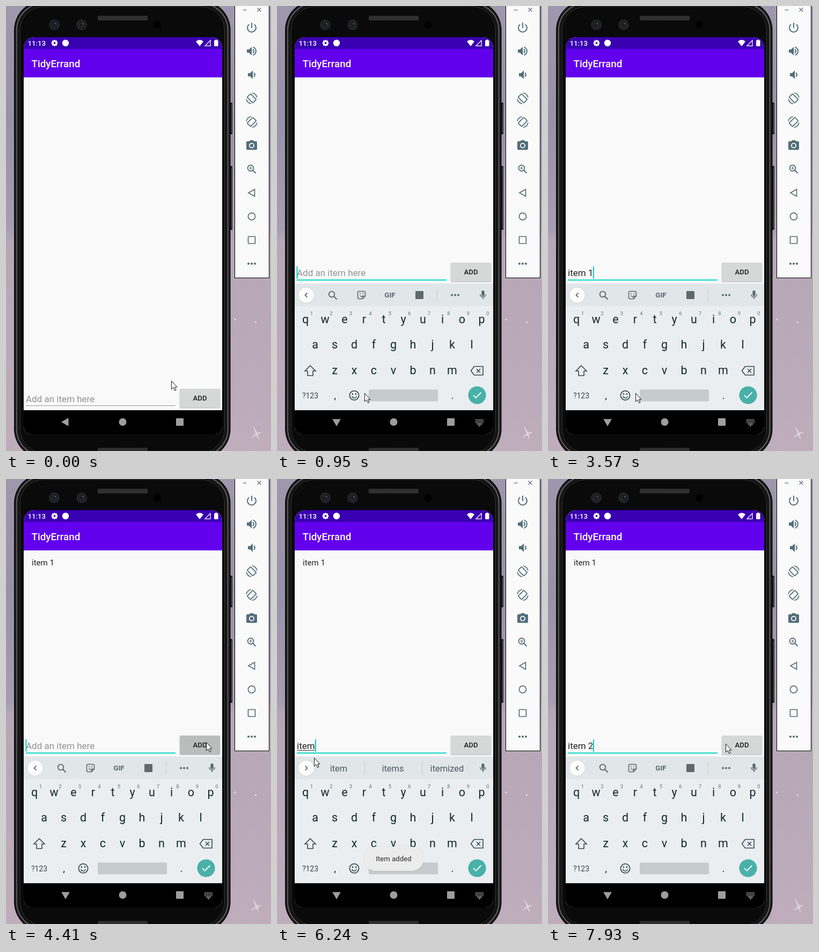
Write an HTML page with a canvas that moves like this. It is 494 px wide and 829 px high and loops after 7.99 s.

```html
<!DOCTYPE html>
<html lang="en">
<head>
<meta charset="utf-8">
<title>Todo list demo</title>
<style>
html, body { margin: 0; width: 100%; height: 100%; overflow: hidden; background: #b5a6b6; }
canvas { display: block; width: 494px; height: 829px; }
</style>
</head>
<body>
<canvas id="stage" width="494" height="829"></canvas>
<script>
const W = 494, H = 829, LOOP = 7990, TAU = Math.PI * 2;
const FONT = 'Roboto, "Noto Sans", sans-serif';
const TEAL = '#03d5c3', SLATE = '#546e7a', INK = '#11272f';
const main = document.getElementById('stage').getContext('2d');
const layer = document.createElement('canvas');
layer.width = W;
layer.height = H;
const keysCtx = layer.getContext('2d');
let c = main;

// [time, text, suggestions]; no suggestions shows the tool row
const EDITS = [
  [660, ''],
  [1470, 'i', ['I', "I'm", 'is']],
  [1960, 'it', ['it', "it's", 'its']],
  [2320, 'ite', ['item', 'items', 'iterate']],
  [2650, 'item', ['item', 'items', 'itemized']],
  [3420, 'item '],
  [3570, 'item 1'],
  [4370, ''],
  [5830, 'i', ['I', "I'm", 'is']],
  [5980, 'it', ['it', "it's", 'its']],
  [6100, 'ite', ['item', 'items', 'iterate']],
  [6220, 'item', ['item', 'items', 'itemized']],
  [6450, 'item '],
  [6550, 'item 2']
];
const MOUSE = [
  [60, 308, 698], [430, 163, 721], [3735, 163, 721], [4130, 373, 490],
  [4430, 373, 490], [4900, 69, 519], [7490, 69, 519], [7750, 354, 433], [7930, 331, 493]
];

const clamp = v => Math.max(0, Math.min(1, v));
const ramp = (t, a, b) => clamp((t - a) / (b - a));
const smooth = p => p * p * (3 - 2 * p);

function rect(x, y, w, h, color) {
  c.fillStyle = color;
  c.fillRect(x, y, w, h);
}
function round(x, y, w, h, r, color) {
  c.fillStyle = color;
  c.beginPath();
  c.roundRect(x, y, w, h, r);
  c.fill();
}
function ring(x, y, w, h, r, color, line) {
  c.strokeStyle = color;
  c.lineWidth = line;
  c.beginPath();
  c.roundRect(x, y, w, h, r);
  c.stroke();
}
function dot(x, y, r, color) {
  c.fillStyle = color;
  c.beginPath();
  c.arc(x, y, r, 0, TAU);
  c.fill();
}
function arc(x, y, r, color, line, from = 0, to = TAU) {
  c.strokeStyle = color;
  c.lineWidth = line;
  c.beginPath();
  c.arc(x, y, r, from, to);
  c.stroke();
}
function text(s, x, y, size, color, align = 'left', weight = 400) {
  c.font = `${weight} ${size}px ${FONT}`;
  c.textAlign = align;
  c.fillStyle = color;
  c.fillText(s, x, y);
}
// Path with its origin at (x, y)
function line(d, x, y, color, width) {
  c.save();
  c.translate(x, y);
  c.strokeStyle = color;
  c.lineWidth = width;
  c.stroke(new Path2D(d));
  c.restore();
}
function shape(d, x, y, color) {
  c.save();
  c.translate(x, y);
  c.fillStyle = color;
  c.fill(new Path2D(d));
  c.restore();
}
function lens(x, y, r, color, w) {
  arc(x - 2, y - 2, r, color, w);
  const k = r * .7 - 2;
  line(`M${k} ${k}L7.5 7.5`, x, y, color, w + .3);
}

function backdrop() {
  const g = c.createLinearGradient(0, 0, 0, H);
  [[0, '#9d98ad'], [.25, '#9891a9'], [.5, '#a79db2'], [.53, '#b6a7b7'], [.75, '#b9a9b9'], [1, '#bfadbc']]
    .forEach(([p, color]) => g.addColorStop(p, color));
  rect(0, 0, W, H, g);
  dot(427, 584, 1.4, '#f3e9ee');
  dot(465.5, 589, 1.4, '#f3e9ee');
  shape('M-6-13L1.5-2L9-2L2 2L4 11L-1 3L-9 8L-2 0Z', 467, 796, '#d6cad5');
  line('M-6-13L4 11M-9 7L9-2', 467, 796, '#eee5ec', .8);
}

function mesh(y) {
  round(171, y, 93, 9, 2, '#292929');
  for (let x = 172; x < 263; x += 3) rect(x, y + 1, 1, 7, '#3b3b3b');
}

function phone() {
  round(416, 180, 6, 59, 2, '#151515');
  rect(420, 183, 1, 53, '#666');
  round(416, 298, 6, 119, 2, '#151515');
  rect(420, 301, 1, 113, '#666');
  round(15, -10, 403.5, 853, 55, '#080808');
  ring(17.5, -7.5, 398.5, 848, 52.5, '#343434', 1);
  ring(20, -5, 393.5, 843, 50, '#777', 1.6);
  ring(23, -2, 387.5, 837, 47, '#1d1d1d', 2);
  ring(26, 1, 381.5, 831, 44, '#414141', 1);
  round(27, 2, 379.5, 829, 43, '#0a0a0a');
  mesh(18);
  mesh(823);
  for (const x of [90, 141]) {
    dot(x, 35, 10, '#22242a');
    dot(x, 35, 6.5, '#15171c');
    arc(x, 35, 4, '#3a3d46', 1.2);
    dot(x + 2, 33, 1.2, '#596070');
  }
  dot(282, 35, 7, '#000');
}

function turnIcon(y, dir) {
  c.save();
  c.translate(458, y);
  c.scale(dir, 1);
  c.rotate(-Math.PI / 4);
  ring(-4.5, -7.5, 9, 15, 1, SLATE, 1.8);
  c.rotate(Math.PI / 4);
  arc(0, 0, 10, SLATE, 1.7, -1.5, -.15);
  arc(0, 0, 10, SLATE, 1.7, 1.65, 3);
  c.restore();
}

function speaker(x, y) {
  shape('M-5-3L-1-3L4-8L4 8L-1 3L-5 3Z', x, y, SLATE);
  arc(x + 4, y, 4, SLATE, 2, -1.1, 1.1);
}

function panel() {
  rect(426, -2, 65, 509, '#000');
  rect(427, -2, 63, 508, '#fafafa');
  const x = 458;
  line('M-3.5 0H3.5', 445, 7.5, SLATE, 1.2);
  line('M-3.5-3.5L3.5 3.5M3.5-3.5L-3.5 3.5', 472, 7, SLATE, 1.2);
  arc(x, 40.5, 8, SLATE, 2, -.9, Math.PI + .9);
  line('M0-9V1', x, 40, SLATE, 2);
  speaker(x - 4, 84);
  arc(x, 84, 8, SLATE, 2, -1.25, 1.25);
  speaker(x - 2, 128);
  turnIcon(172, 1);
  turnIcon(216, -1);
  round(x - 10, 252, 20, 16, 2, SLATE);
  shape('M-5-7L-3-10H3L5-7Z', x, 260, SLATE);
  dot(x, 260, 5, '#fafafa');
  dot(x, 260, 3.2, SLATE);
  lens(x, 304, 5.5, SLATE, 1.8);
  line('M-5-2H1M-2-5V1', x, 304, SLATE, 1.2);
  line('M5.5-6.5V6.5L-6 0Z', x, 348, SLATE, 1.7);
  arc(x, 392, 6.6, SLATE, 1.7);
  ring(x - 6.5, 429.5, 13, 13, .5, SLATE, 1.7);
  for (const d of [-6, 0, 6]) dot(x + d, 480, 2.1, SLATE);
}

function statusBar() {
  rect(33, 58, 370, 23, '#3900b1');
  text('11:13', 40.5, 74, 13.2, '#fff', 'left', 500);
  for (let i = 0; i < 8; i++) {
    const a = i * TAU / 8;
    line(`M0 0L${Math.cos(a) * 6} ${Math.sin(a) * 6}`, 90.5, 69, '#fff', 2.6);
  }
  arc(90.5, 69, 3.4, '#fff', 2.8);
  dot(90.5, 69, 1.9, '#3900b1');
  dot(111, 69, 6.2, '#fff');
  shape('M0 6L-7-3Q0-9 7-3Z', 361, 69, '#fff');
  line('M5-5V5.3H-5Z', 376, 69, '#fff', 1.3);
  round(388, 64, 7.5, 11, 1, '#fff');
  rect(390, 62.7, 3.5, 2, '#fff');
}

function appBar() {
  rect(33, 80, 370, 53, '#6200ee');
  text('TidyErrand', 47.5, 114, 18.8, '#fff', 'left', 500);
}

function inputRow(t, edit) {
  const dy = t < 700 ? 235 : 0;
  const typed = edit ? edit[1] : '';
  c.font = `400 17px ${FONT}`;
  const end = 37 + c.measureText(typed).width;
  if (typed) text(typed, 37, 503, 17, '#212121');
  else text('Add an item here', 37, 503 + dy, 17, '#919191');
  if (edit && edit[2]) rect(37, 505, end - 37, 1, '#333');
  if (edit) {
    rect(37, 509.5 + dy, 279, 2, TEAL);
    if ((t - edit[0]) % 1000 < 500) rect(Math.round(end) - (typed ? 0 : .5), 485 + dy, 2, 23, TEAL);
  } else {
    rect(37, 744, 279, 1, '#979797');
  }

  c.save();
  c.shadowColor = 'rgba(0,0,0,.3)';
  c.shadowBlur = 2;
  c.shadowOffsetY = 1;
  round(324, 478 + dy, 75, 35, 2, '#d6d7d7');
  c.restore();
  const press = ramp(t, 4340, 4420) * (1 - ramp(t, 4430, 4800));
  if (press) round(324, 478 + dy, 75, 35, 2, `rgba(0,0,0,${.14 * press})`);
  text('ADD', 361.5, 500 + dy, 13.2, '#1c1c1c', 'center', 500);
}

function toolRow(words) {
  const grey = '#5c6970';
  rect(33, 517, 370, 42, '#e1e6e9');
  c.save();
  c.shadowColor = 'rgba(0,0,0,.18)';
  c.shadowBlur = 2;
  dot(54.5, 538.5, 14.3, '#fdfdfd');
  c.restore();
  line(words ? 'M-2-4L2 0L-2 4' : 'M2-4L-2 0L2 4', 54.5, 538.5, '#46545b', 1.6);
  round(381.3, 530, 5.4, 10.5, 2.7, grey);
  arc(384, 537, 5.3, grey, 1.5, 0, Math.PI);
  line('M0 5V9', 384, 537, grey, 1.6);
  if (words) {
    words.forEach((w, i) => text(w, 115 + i * 101, 545, 16.5, '#4b5960', 'center'));
    rect(163, 527, 1, 23, '#c3c9cd');
    rect(270, 527, 1, 23, '#c3c9cd');
    return;
  }
  lens(104, 539, 5.3, grey, 1.8);
  line('M-4.5-7H4.5Q7-7 7-4.5V2L2 7H-4.5Q-7 7-7 4.5V-4.5Q-7-7-4.5-7ZM2 7V4Q2 2 4 2H7', 157.5, 538.5, grey, 1.6);
  dot(155, 536, 1.1, grey);
  dot(160, 536, 1.1, grey);
  arc(157.5, 538, 3.2, grey, 1.3, .3, 2.8);
  text('GIF', 210.5, 543, 13.5, grey, 'center', 700);
  round(258, 531, 15, 15, 1, grey);
  rect(298, 528, 1, 22, '#c6ccd0');
  for (const d of [-6, 0, 6]) dot(332 + d, 538.5, 2, grey);
}

function keyboard(words) {
  c.clearRect(0, 0, W, H);
  rect(33, 559, 370, 194, '#eaeef1');
  toolRow(words);
  [...'qwertyuiop'].forEach((k, i) => {
    const x = 53 + i * 36.5;
    text(k, x, 590.5, 21.5, INK, 'center');
    text((i + 1) % 10, x + 11.5, 575.5, 9.5, '#66737a', 'center');
  });
  [...'asdfghjkl'].forEach((k, i) => text(k, 71 + i * 36.5, 638, 21.5, INK, 'center'));
  [...'zxcvbnm'].forEach((k, i) => text(k, 107.5 + i * 36.5, 685.5, 21.5, INK, 'center'));
  line('M0-9.5L10 .5H5V9H-5V.5H-10Z', 62, 679.5, '#344850', 1.6);
  line('M-5.5-8H11V8H-5.5L-11.5 0ZM-1-3.5L6 3.5M6-3.5L-1 3.5', 373, 679.5, '#344850', 1.6);
  text('?123', 62, 730.5, 14, '#33464e', 'center');
  text(',', 108, 732, 19, INK, 'center');
  text('.', 327, 732, 19, INK, 'center');
  arc(144, 725.5, 8.6, '#344850', 1.7);
  dot(141, 723, 1.4, '#344850');
  dot(147, 723, 1.4, '#344850');
  arc(144, 726, 4.3, '#344850', 1.6, .2, 2.94);
  round(171, 714.5, 129, 22, 2, '#c6cbce');
  dot(373, 725, 16.6, '#49b1a8');
  line('M-7 0L-2.5 5L7.5-5', 373, 725, '#fff', 1.8);
}

function navBar(t) {
  const white = 'rgba(255,255,255,.62)';
  const spin = ramp(t, 690, 855);
  c.save();
  c.translate(112 - spin, 775 - spin);
  c.rotate(Math.PI - spin * Math.PI / 2);
  c.fillStyle = white;
  c.beginPath();
  for (let i = 0; i < 3; i++) c.lineTo(Math.cos(i * TAU / 3) * 9, Math.sin(i * TAU / 3) * 9);
  c.fill();
  c.restore();
  dot(217.5, 775, 7, white);
  round(317, 768, 14, 14, 1, white);
  const show = ramp(t, 700, 860);
  if (!show) return;
  c.globalAlpha = show;
  for (let row = 0; row < 3; row++)
    for (let i = 0; i < 6; i++) rect(370 + i * 2.6, 770 + row * 2.7, 1.7, 1.7, white);
  rect(373, 778, 9, 1.7, white);
  shape('M-2.5 0H2.5L0 2.5Z', 377.5, 781, white);
  c.globalAlpha = 1;
}

function toast(t) {
  const a = ramp(t, 4500, 4800) * (1 - ramp(t, 6480, 6800));
  if (!a) return;
  c.globalAlpha = a;
  c.save();
  c.shadowColor = 'rgba(0,0,0,.08)';
  c.shadowBlur = 3;
  round(162, 685, 111, 45, 22, '#ececec');
  c.restore();
  text('Item added', 217.5, 712, 13.2, '#2a2a2a', 'center');
  c.globalAlpha = 1;
}

function pointer(t) {
  let i = MOUSE.findIndex(k => k[0] > t);
  if (i < 0) i = MOUSE.length;
  const a = MOUSE[Math.max(0, i - 1)], b = MOUSE[Math.min(i, MOUSE.length - 1)];
  const p = a === b ? 0 : smooth(ramp(t, a[0], b[0]));
  const x = a[1] + (b[1] - a[1]) * p, y = a[2] + (b[2] - a[2]) * p;
  const d = 'M.5.5V16L4 12.8L6.7 18.5L9 17.5L6.5 12H11Z';
  shape(d, x, y, '#fff');
  line(d, x, y, '#111', 1);
}

function screen(t) {
  const edit = EDITS.filter(e => e[0] <= t).pop();
  c.save();
  c.beginPath();
  c.roundRect(33, 58, 370, 740, [20, 20, 14, 14]);
  c.clip();
  rect(33, 58, 370, 740, '#f9f9f9');
  statusBar();
  appBar();
  if (t >= 4390) text('item 1', 48, 161, 15.1, '#212121');
  inputRow(t, edit);
  rect(33, 753, 370, 45, '#000');
  const rise = 1 - Math.pow(1 - ramp(t, 700, 950), 1.7);
  if (rise) {
    c = keysCtx;
    keyboard(edit && edit[2]);
    c = main;
    c.globalAlpha = rise;
    c.drawImage(layer, 0, Math.round((1 - rise) * 110));
    c.globalAlpha = 1;
  }
  navBar(t);
  toast(t);
  c.restore();
}

function draw(t) {
  backdrop();
  phone();
  panel();
  screen(t);
  pointer(t);
}

const start = performance.now();
function tick(now) {
  draw(Math.max(0, now - start) % LOOP);
  requestAnimationFrame(tick);
}
draw(0);
requestAnimationFrame(tick);
</script>
</body>
</html>
```
